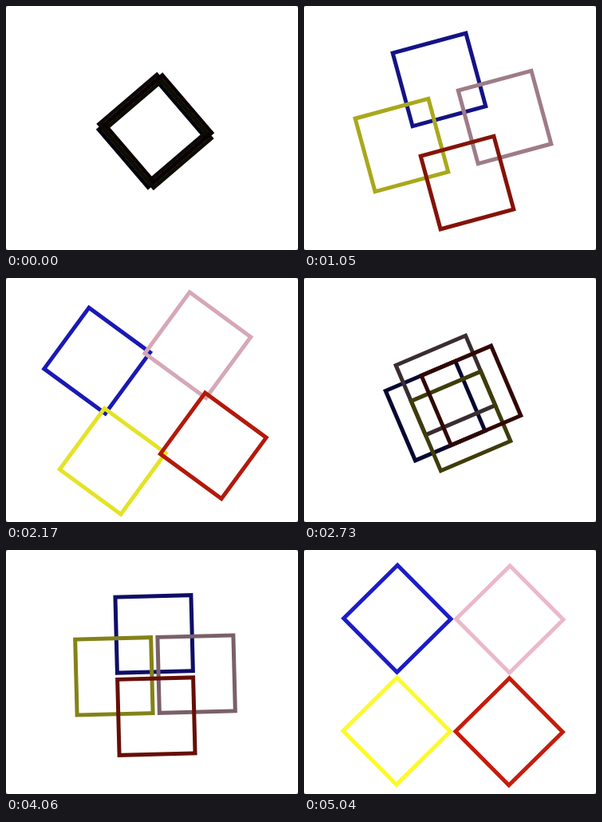
An HTML page that plays this animation: 366x306 px, repeating every 5110 ms.

```html
<!DOCTYPE html>
<html lang="en">
<head>
<meta charset="utf-8">
<title>Four squares</title>
<style>
  html, body { margin: 0; width: 100%; height: 100%; overflow: hidden; background: #777; }
  svg { display: block; width: 366px; height: 306px; background: #fff; border-radius: 3px; }
  rect { fill: none; stroke-width: 5; }
</style>
</head>
<body>
<svg viewBox="0 0 366 306">
  <g id="group"></g>
</svg>
<script>
  const LOOP = 5110, STEP = 70, CYCLE = 3150, START = 435;
  const SPREAD = 100, SIDE = 95;
  // Colour when fully apart, and direction from the centre.
  const SQUARES = [
    { rgb: [28, 28, 200], x: -1, y: -1 },
    { rgb: [236, 186, 202], x: 1, y: -1 },
    { rgb: [253, 251, 42], x: -1, y: 1 },
    { rgb: [198, 28, 12], x: 1, y: 1 }
  ];

  const group = document.getElementById('group');
  for (const sq of SQUARES) {
    sq.el = document.createElementNS(group.namespaceURI, 'rect');
    sq.el.setAttribute('x', -SIDE / 2);
    sq.el.setAttribute('y', -SIDE / 2);
    sq.el.setAttribute('width', SIDE);
    sq.el.setAttribute('height', SIDE);
    group.append(sq.el);
  }

  const bezier = (a, b, s) => 3 * a * s * (1 - s) ** 2 + 3 * b * s * s * (1 - s) + s ** 3;

  // Same curve as the CSS "ease" keyword.
  function ease(x) {
    let lo = 0, hi = 1;
    for (let i = 0; i < 24; i++) {
      const mid = (lo + hi) / 2;
      if (bezier(0.25, 0.25, mid) < x) lo = mid; else hi = mid;
    }
    return bezier(0.1, 1, lo);
  }

  function draw(time) {
    const phase = ((time - START + CYCLE) % CYCLE) / CYCLE * 2;
    const opening = phase < 1;
    const open = opening ? ease(phase) : 1 - ease(phase - 1);
    const turn = (opening ? 90 : -90) * (1 - open);
    const shift = SPREAD * Math.SQRT1_2 * open;

    group.setAttribute('transform', `translate(187 157) rotate(${turn})`);
    for (const { el, rgb, x, y } of SQUARES) {
      el.setAttribute('transform', `translate(${x * shift} ${y * shift}) rotate(45)`);
      el.setAttribute('stroke', `rgb(${rgb.map(c => Math.round(c * open))})`);
    }
  }

  const begin = performance.now();
  function tick() {
    const time = (performance.now() - begin) % LOOP;
    draw(Math.floor(time / STEP) * STEP);
    requestAnimationFrame(tick);
  }
  tick();
</script>
</body>
</html>
```
